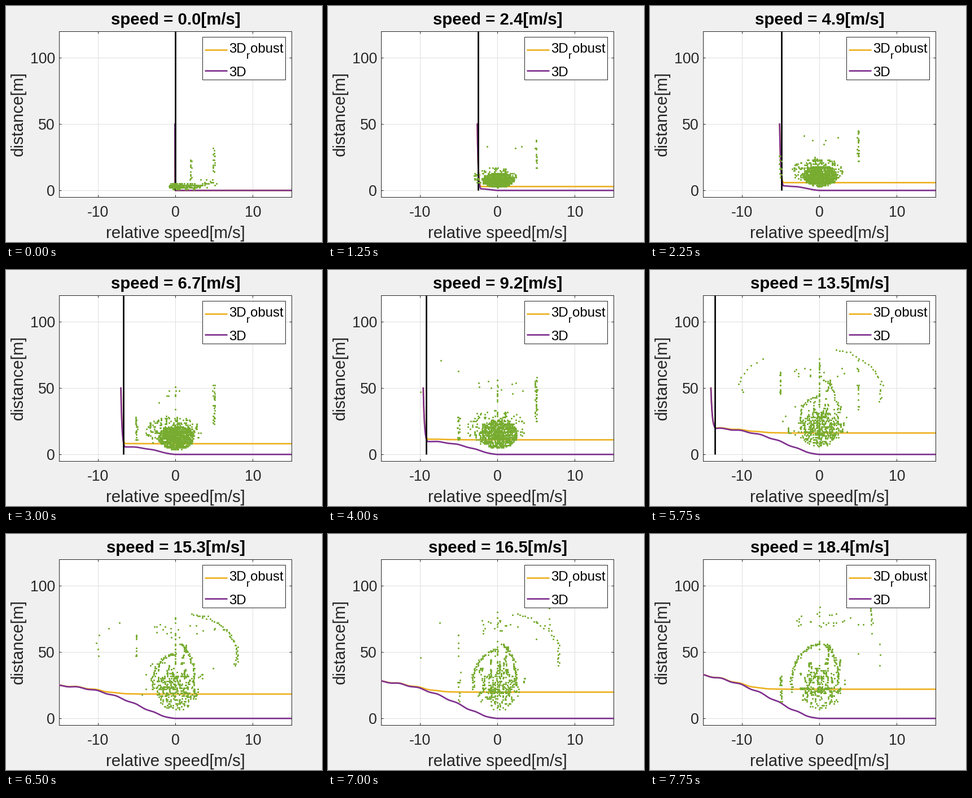
Recreate the animation shown at these times as a matplotlib script. Size 560 by 420 pixels, loop 8 s.

```python
import matplotlib.pyplot as plt
import numpy as np
from matplotlib.animation import FuncAnimation
from matplotlib.patches import Rectangle

W, H, DPI = 560, 420, 100
PX = 72 / DPI
FRAMES, INTERVAL = 32, 250
SPEED_STEP, TOP_SPEED = 0.612, 18.36
DARK, YELLOW, PURPLE, GREEN = "#262626", "#EDB120", "#7E2F8E", "#77AC30"
plt.rcParams["font.family"] = "Liberation Sans"
plt.rcParams["axes.unicode_minus"] = False


# Safety limits

def braking(v, speed):
    """Braking distance, saturating for fast closing objects, slightly stepped."""
    if speed == 0:
        return np.zeros_like(v)
    u = np.maximum(-v, 0)
    reach = speed ** 2 / 11 + 0.3 * speed
    steps = 0.025 * speed * np.minimum(u / 3, 1) * np.sin(2 * np.pi * (u - 2) / 2.5)
    return reach * (1 - np.exp(-(u / (0.49 * speed)) ** 1.65)) + steps


def robust_braking(v, speed):
    """Soft maximum of the braking distance and a constant headway."""
    headway, soft = 1.2 * speed, 0.15 * speed + 0.01
    return headway + soft * np.logaddexp(0, (braking(v, speed) - headway) / soft)


def limit_curve(height, speed):
    """Steep fall from 50 m to the knee, then the braking profile."""
    top, knee = -1.035 * speed - 0.05, min(0.35 - 1.02 * speed, 0)
    v = np.linspace(knee, 15, 400)
    body = height(v, speed)
    q = np.linspace(0, 1, 40)
    fall = (np.exp(-3.5 * q) - np.exp(-3.5)) / (1 - np.exp(-3.5))
    steep = body[0] + (50 - body[0]) * fall
    return np.r_[top + (knee - top) * q, v], np.r_[steep, body]


# Radar returns

def bump(p, centre, width):
    return max(0, 1 - abs(p - centre) / width)


def radar_points(step):
    rng = np.random.default_rng(70 + step)
    speed = SPEED_STEP * step
    p = speed / TOP_SPEED
    parts = []

    def add(x, y, jitter=0.0):
        n = len(x)
        parts.append(np.c_[x + rng.normal(0, jitter, n), y + rng.normal(0, 4 * jitter, n)])

    def blob(n, x, y, rx, ry):
        angle, r = rng.uniform(0, 2 * np.pi, round(n)), rng.random(round(n)) ** 0.6
        add(x + rx * r * np.cos(angle), y + ry * r * np.sin(angle))

    def line(n, x0, y0, x1, y1, jitter=0.06):
        t = rng.random(round(n))
        add(x0 + (x1 - x0) * t, y0 + (y1 - y0) * t, jitter)

    def arc(n, rx, y, ry, start, end):
        a = np.radians(np.linspace(start, end, round(n)))
        add(rx * np.cos(a), y + ry * np.sin(a), 0.1)

    crowd = np.sin(np.pi * p ** 0.55) ** 2
    start, late, final = bump(p, 0, 0.12), np.clip((p - 0.6) / 0.25, 0, 1), bump(p, 1, 0.15)
    far, centre = 32 + 55 * p, 3 + 20 * p ** 0.7

    # Dense cloud ahead, a wider skirt, and short vertical streaks
    blob(170 + 870 * crowd, 0.1, centre, 1 + 1.8 * p ** 0.3, 0.7 * centre)
    blob(240 * crowd, -0.3, 1.3 * centre, 1.5 + 3.5 * p ** 0.5, 0.9 * centre)
    blob(20 * p, 0, 0.85 * far, 4, 6)
    for _ in range(round(30 * p)):
        x, y = rng.normal(0, 1.6), rng.uniform(0.6, 1.8) * centre
        line(7, x, y, x + rng.uniform(-0.3, 0.3), y + rng.uniform(3, 8), 0.02)

    # Low fan and poles while standing still
    blob(70 * start, 1.5, 3, 2, 2)
    line(55 * start, 1, 2, 5.2, 6.5, 0.35)
    line(18 * start, 2, 4, 2, 24, 0.03)

    # Roadside columns
    line(16 + 30 * bump(p, 0.5, 0.3) - 14 * late, 5, 0.42 * far, 5, far)
    line(38 * bump(p, 0.7, 0.4), 0, centre, 0, far, 0.02)
    line(32 * bump(p, 0.43, 0.25), -5, 10, -5, 28, 0.1)
    line(16 * bump(p, 0.73, 0.25), -5, 45, -5, 64, 0.03)
    line(26 * final, -4.9, 12, -5, 32)

    # Curved walls at longer range
    arc(50 * bump(p, 0.83, 0.2), 8, 48, 32, -15, 75)
    arc(12 * bump(p, 0.7, 0.25), 10.3, 53, 26, 135, 195)
    arc(60 * late, 4 * p - 0.4, 26, 45 * p - 15, 90, 190)
    arc(55 * late, 2.4, 30, 27, -10, 75)
    line(22 * late, 0.8, 40, 1.4, 56)
    line(35 * final, -2.6, 22, 2, 22, 0.2)
    line(10 * final, 6.6, 84, 6.8, 70)

    x, y = np.concatenate(parts).T
    return np.round(x, 1), np.maximum(np.round(y), 1)


fig = plt.figure(figsize=(W / DPI, H / DPI), dpi=DPI, facecolor="#F0F0F0")

left, right, top, bottom = 94, 506, 45, 340
ax = fig.add_axes([left / W, 1 - bottom / H, (right - left) / W, (bottom - top) / H])
ax.set(xlim=(-15, 15), ylim=(-5, 120), xticks=[-10, 0, 10], yticks=[0, 50, 100])
ax.tick_params(direction="in", top=True, right=True, length=4 * PX, width=PX,
               color=DARK, labelbottom=False, labelleft=False)
ax.grid(color="#DFDFDF", linewidth=PX)
ax.set_axisbelow(True)
for spine in ax.spines.values():
    spine.set(color=DARK, linewidth=PX)

LINE = 2.67 * PX
robust, = ax.plot([], [], color=YELLOW, lw=LINE, zorder=3)
plain, = ax.plot([], [], color=PURPLE, lw=LINE, zorder=4)
own, = ax.plot([], [], color="black", lw=LINE, zorder=5, solid_capstyle="butt")
dots, = ax.plot([], [], ".", color=GREEN, ms=6.2 * PX, mew=0, zorder=6)

# Overlay in pixel coordinates for the text and the legend
over = fig.add_axes([0, 0, 1, 1])
over.set(xlim=(0, W), ylim=(H, 0))
over.axis("off")


def label(x, y, text, size, color=DARK, ha="center", **kw):
    return over.text(x, y, text, fontsize=size * PX, color=color, ha=ha,
                     va="baseline", rotation_mode="anchor", **kw)


title = label(300.5, 33, "", 29.33, "black", weight="bold")
label(300.5, 413, "relative speed[m/s]", 29.33)
label(30, 192, "distance[m]", 29.33, rotation=90)
for v in (-10, 0, 10):
    label(300.5 + v * (right - left) / 30, 375, str(v), 26.67)
for d in (0, 50, 100):
    label(87, 338 - d * (bottom - top) / 125, str(d), 26.67, ha="right")

over.add_patch(Rectangle((348, 55), 147, 76, facecolor="white", edgecolor=DARK, lw=PX))
for y, color in ((77.5, YELLOW), (115, PURPLE)):
    over.plot([352, 391.5], [y, y], color=color, lw=LINE, solid_capstyle="butt")
for x, y, text, size in ((395, 83, "3D", 24), (426, 94, "r", 19),
                         (433, 83, "obust", 24), (395, 125, "3D", 24)):
    label(x, y, text, size, "black", "left")


def draw(frame):
    step = max(frame - 1, 0)
    speed = SPEED_STEP * step
    plain.set_data(*limit_curve(braking, speed))
    robust.set_data(*limit_curve(robust_braking, speed))
    own.set_data([-speed, -speed], [0, 120])
    dots.set_data(*radar_points(step))
    title.set_text(f"speed = {speed:.1f}[m/s]")
    return robust, plain, own, dots, title


anim = FuncAnimation(fig, draw, frames=FRAMES, interval=INTERVAL, repeat=True, repeat_delay=0)
plt.show()
```
